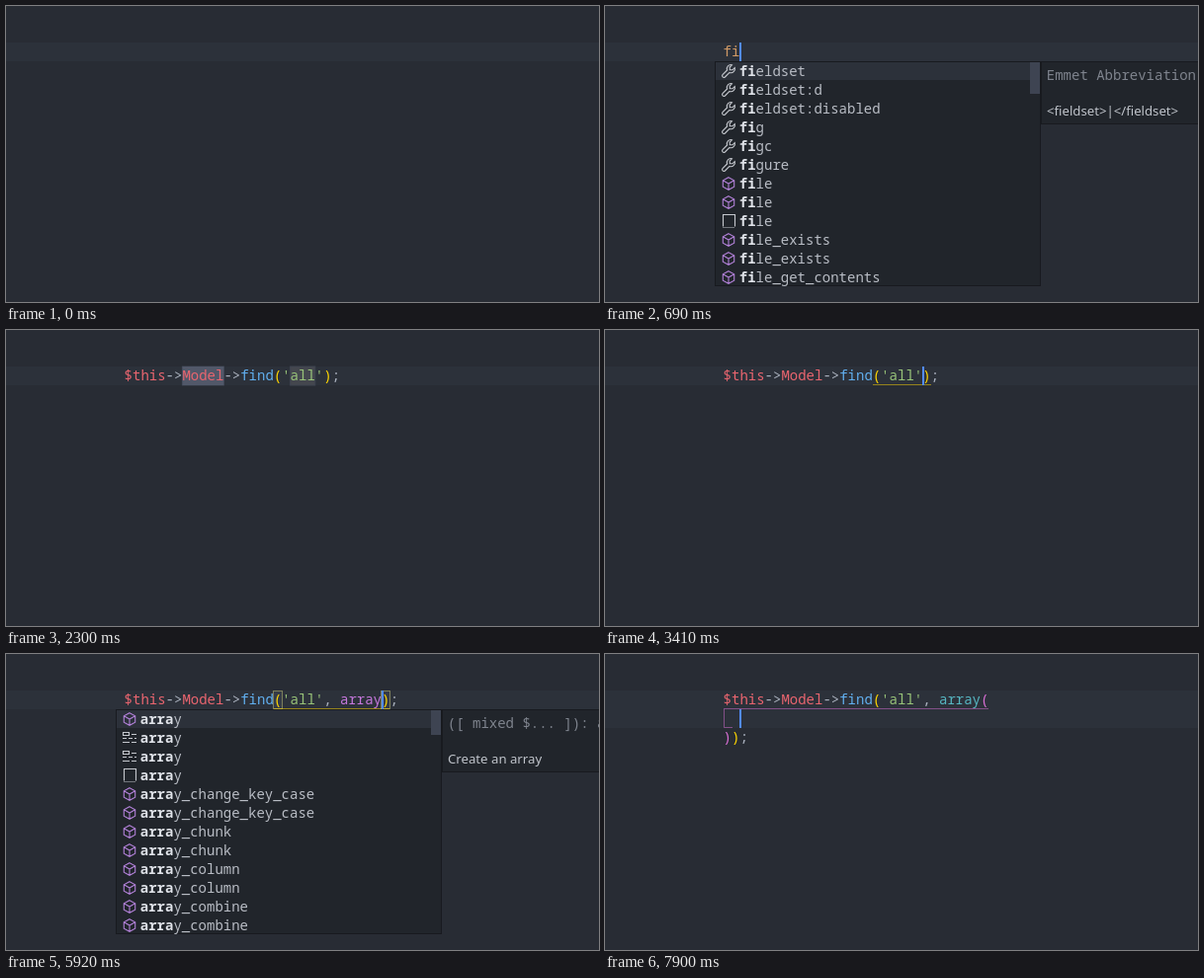
Write an HTML page that moves like this. It is 600 px wide and 300 px high and loops after 8 s.

```html
<!DOCTYPE html>
<html lang="en">
<head>
<meta charset="utf-8">
<title>Code completion</title>
<style>
  html, body { margin: 0; width: 100%; height: 100%; overflow: hidden; background: #282c34; }
  svg { display: block; width: 600px; height: 300px; }
  text { white-space: pre; font: 14px "Roboto Mono", "Noto Sans Mono", monospace; font-variant-ligatures: none; }
  text.body { font: 13.2px "Segoe UI", "Open Sans", sans-serif; font-variant-ligatures: none; }
  .match { font-weight: 700; fill: #dfe2e8; }
  .icon { fill: none; stroke-width: 1.1; }
</style>
</head>
<body>
<svg id="stage" viewBox="0 0 600 300"></svg>
<script>
const stage = document.getElementById('stage');
const LOOP = 8000, LEFT = 119.6, CW = 8.4, LH = 19, TOP = 37;
const C = {
  line: '#2c313a', panel: '#21252b', edge: '#181a1f', text: '#abb2bf', red: '#e9656f',
  blue: '#61afef', green: '#98c379', orange: '#d19a66', purple: '#c678dd', cyan: '#56b6c2',
  gold: '#ffd700', orchid: '#da70d6', cursor: '#528bff', item: '#b9bdc5', dim: '#7f848e'
};

const ICONS = {
  cube: ['#b180d7', 'M0-6.3L5.7-3.2V3.2L0 6.3L-5.7 3.2V-3.2ZM-5.7-3.2L0 0L5.7-3.2M0 0V6.3'],
  wrench: ['#c5c8ce', 'M3.4-6.3A4 4 0 0 0-1.4-1L-6 3.6A1.7 1.7 0 0 0-3.6 6L1 1.4A4 4 0 0 0 6.3-3.4L4-1.2H1.2V-4Z'],
  snippet: ['#c5c8ce', 'M-5.5 5.5V-6.5H6.5V5.5M-5.5 6.5h1m1 0h1m1 0h1m1 0h1m1 0h1m1 0h1'],
  keyword: ['#c5c8ce', 'M-6.5-5.5h6v3h-6zM2-3.5h5M-7 .5h4M-1 .5h4M5 .5h2M-7 4.5h7M2 4.5h5']
};

// List rows: icon letter, then label; "*" repeats the row.
const KIND = { c: 'cube', w: 'wrench', s: 'snippet', k: 'keyword' };
const rows = s => s.split(' ').flatMap(r => {
  const row = [KIND[r[0]], r.slice(1).replace('*', '')];
  return r.endsWith('*') ? [row, row] : [row];
});
const LISTS = {
  fi: rows('wfieldset wfieldset:d wfieldset:disabled wfig wfigc wfigure cfile* sfile cfile_exists* cfile_get_contents'),
  fin: rows('kfinal* kfinally sfind cfinfo cfinfo_buffer* cfinfo_close* cfinfo_file* cfinfo_open'),
  find: rows('sfind cfileinode'),
  a: rows('cabs* kabstract* caccelerator_set_status cacos* cacosh* sact caddcslashes*'),
  array: rows('carray karray* sarray carray_change_key_case* carray_chunk* carray_column* carray_combine*')
};
const DOCS = {
  fieldset: [['Emmet Abbreviation'], '<fieldset>|</fieldset>'],
  find: [['CakePHP: $this->find', 'ppets)'], "$this->Model->find('all');"],
  abs: [['( mixed $number ): number'], 'Absolute value'],
  array: [['([ mixed $... ]): array'], 'Create an array']
};

const call = (arg = '') => `$this->Model->find('all'${arg});`;
const closed = { list: null, doc: null };
const guide = (a, b) => ({ under: [a, b + 1], box: [a, b] });

// Each entry changes part of the state from its time on.
const STEPS = [
  [0, { src: '', col: 0, on: 0, row: 0, arg: 'orange', pairs: 0, stops: null, sel: null, under: null, box: null, bar: 0, ...closed }],
  [50, { src: 'f', col: 1, on: 1, arg: 'text' }],
  [120, { arg: 'orange' }],
  [430, { src: 'fi', col: 2 }],
  [520, { list: 'fi', hit: 'fi', bar: 32 }],
  [690, { doc: 'fieldset' }],
  [940, { src: 'fin', col: 3, list: 'fin', hit: 'fin', doc: null, bar: 60 }],
  [1250, { src: 'find', col: 4, list: 'find', hit: 'find', bar: 0 }],
  [1320, { doc: 'find' }],
  [1750, { src: call(), col: 12, ...closed }],
  [1860, { stops: [[7, 12], [20, 23]], sel: [7, 12] }],
  [2060, { pairs: 1 }],
  [2300, { on: 0 }],
  [2480, { on: 1, col: 23, sel: [20, 23], under: [18, 25] }],
  [2980, { on: 0 }],
  [3410, { on: 1, col: 24, sel: null, stops: null }],
  [3480, { box: [18, 24] }],
  [3910, { on: 0 }],
  [4110, { on: 1, src: call(','), col: 25, ...guide(18, 25) }],
  [4410, { src: call(', '), col: 26, ...guide(18, 26) }],
  [4720, { src: call(', a'), col: 27, ...guide(18, 27) }],
  [4780, { list: 'a', hit: 'a', bar: 19 }],
  [4840, { doc: 'abs' }],
  [4910, { src: call(', ar'), col: 28, ...guide(18, 28) }],
  [4980, { list: 'array', hit: 'ar', bar: 22, doc: null }],
  [5050, { doc: 'array' }],
  [5300, { src: call(', arr'), col: 29, ...guide(18, 29) }],
  [5350, { hit: 'arr', bar: 24 }],
  [5670, { src: call(', arra'), col: 30, ...guide(18, 30) }],
  [5740, { hit: 'arra', bar: 25 }],
  [5920, { src: call(', array'), col: 31, arg: 'purple', ...guide(18, 31) }],
  [5990, { hit: 'array', bar: 26 }],
  [6420, { on: 0 }],
  [6940, { on: 1 }],
  [7020, { src: call(', array()'), col: 32, arg: 'cyan', ...closed, ...guide(18, 33) }],
  [7270, { pairs: 2, ...guide(31, 32) }],
  [7520, { on: 0 }],
  [7700, { on: 1, src: call(', array(\n)'), col: 2, row: 1, under: null, box: null }],
  [7900, { under: [0, 32], scope: 1 }]
];

const x = col => LEFT + col * CW;
const esc = s => s.replace(/&/g, '&amp;').replace(/</g, '&lt;').replace(/>/g, '&gt;');
const rect = (l, t, w, h, fill, more = '') =>
  `<rect x="${l}" y="${t}" width="${w}" height="${h}" fill="${fill}" ${more}/>`;
const text = (l, t, s, fill, cls = '') =>
  `<text x="${l}" y="${t}" fill="${fill}" class="${cls}">${esc(s)}</text>`;
const panel = (l, w, h) =>
  rect(l + .5, 56.5, w - 1, h - 1, C.panel, `stroke="${C.edge}"`);

function code(s) {
  let depth = 0;
  const bracket = level => s.pairs > level ? [C.gold, C.orchid][level] : C.text;
  const colour = tok => {
    if (tok === '(') return bracket(depth++);
    if (tok === ')') return bracket(--depth);
    if (tok === '$this' || tok === 'Model') return C.red;
    if (tok === 'find' && s.src[0] === '$') return C.blue;
    if (tok[0] === "'") return C.green;
    return /\w/.test(tok) ? C[s.arg] : C.text;
  };
  return s.src.split('\n').map((line, i) =>
    [...line.matchAll(/'\w+'|\$?\w+|->|[(),;]/g)].map(m =>
      text(x(m.index), TOP + 14 + i * LH * 2, m[0], colour(m[0]))).join('')).join('');
}

function marks(s) {
  let out = '';
  for (const [a, b] of s.stops || [])
    out += rect(x(a), TOP, (b - a) * CW, LH, 'rgba(124,124,124,.3)', 'stroke="#3e4451"');
  if (s.sel) out += rect(x(s.sel[0]), TOP, (s.sel[1] - s.sel[0]) * CW, LH, '#67769660');
  for (const c of s.box || [])
    out += rect(Math.round(x(c)) - .5, TOP + .5, 9, LH - 1, '#515a6b40', 'stroke="#7d7f5c"');
  if (s.under) {
    const tint = s.pairs > 1 ? C.orchid : C.gold;
    const l = Math.round(x(s.under[0])), r = Math.round(x(s.under[1]));
    out += rect(l, 55, r - l, 1, tint, 'opacity=".5"');
    if (s.scope)
      out += `<path d="M120.5 56V74.5H129" fill="none" stroke="${tint}" opacity=".5"/>`;
  }
  return out;
}

// Letters that match the typed prefix, in order, are bold.
function label(word, hit) {
  let n = 0;
  return [...word].map(ch => {
    if (ch !== hit[n]) return ch;
    n++;
    return `\u0001${ch}\u0002`;
  }).join('').replace(/\u0002\u0001/g, '')
    .replace(/\u0001/g, '<tspan class="match">').replace(/\u0002/g, '</tspan>');
}

function popup(s) {
  if (!s.list) return '';
  const list = LISTS[s.list];
  let out = panel(111, 330, list.length * LH) + rect(112, 57, 328, 18, C.line);
  if (s.bar) out += rect(430, 57, 10, s.bar, '#3e4452');
  list.forEach(([kind, word], i) => {
    const [tint, d] = ICONS[kind], y = 66 + i * LH;
    out += `<path class="icon" transform="translate(125 ${y})" stroke="${tint}" d="${d}"/>` +
      `<text x="135.8" y="${y + 5}" fill="${C.item}">${label(word, s.hit)}</text>`;
  });
  return out;
}

function details(s) {
  if (!s.doc) return '';
  const [head, body] = DOCS[s.doc];
  const extra = (head.length - 1) * LH;
  return panel(441, 170, 64 + extra) +
    head.map((h, i) => text(446.8, 75 + i * LH, h, C.dim)).join('') +
    text(447, 111 + extra, body, '#bfc3ca', 'body');
}

function stateAt(t) {
  const s = {};
  for (const [at, change] of STEPS) if (at <= t) Object.assign(s, change);
  return s;
}

let last = '';
function draw(t) {
  const s = stateAt(t);
  let out = rect(0, 0, 600, 300, '#282c34') + rect(0, TOP, 600, LH * (s.row + 1), C.line) +
    marks(s) + code(s);
  if (s.on) out += rect(Math.floor(x(s.col) + .01), TOP + s.row * LH, 2, LH, C.cursor);
  out += popup(s) + details(s);
  if (out !== last) stage.innerHTML = last = out;
}

const start = performance.now();
function tick() {
  draw((performance.now() - start) % LOOP);
  requestAnimationFrame(tick);
}
tick();
</script>
</body>
</html>
```
